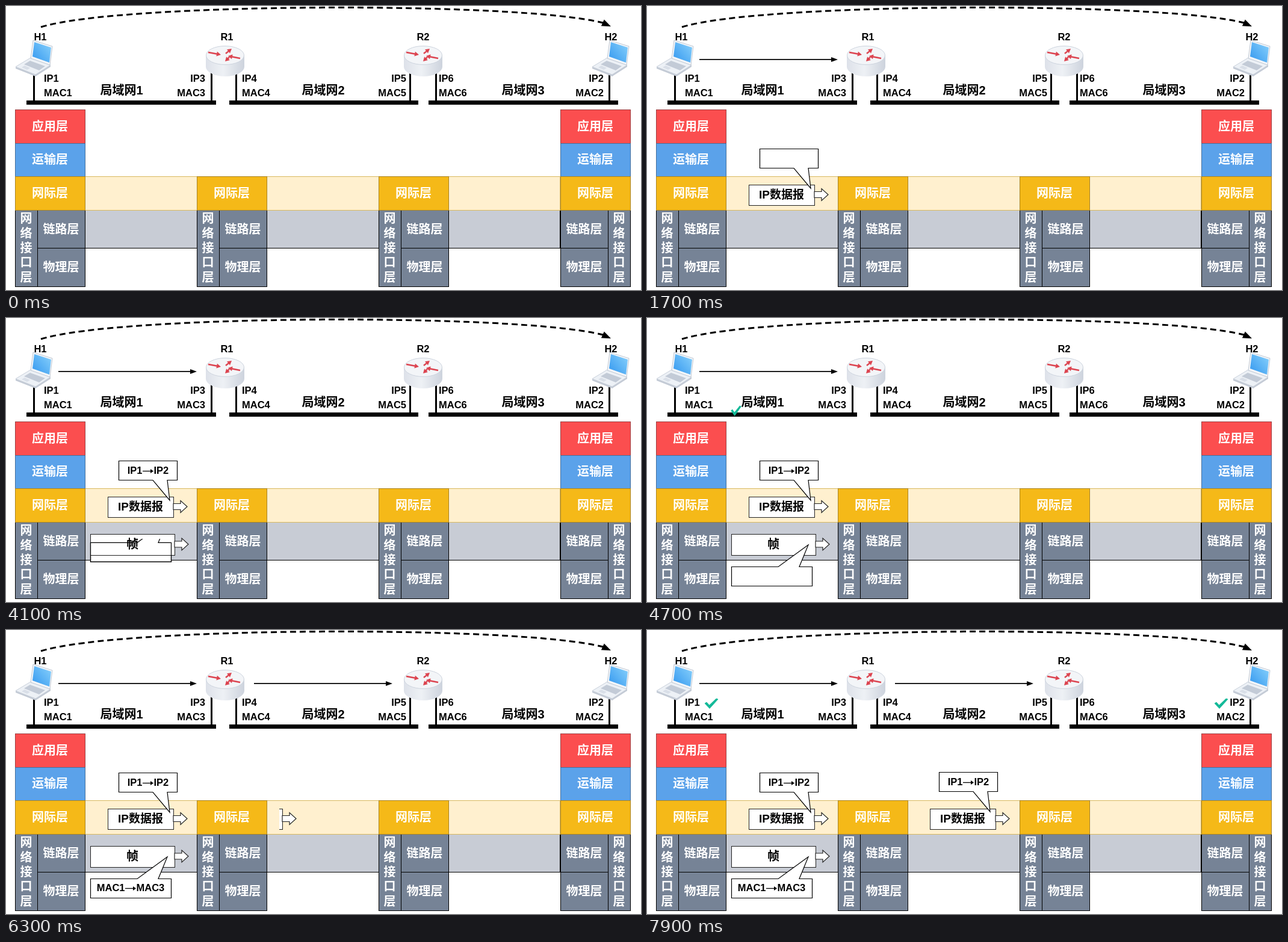
An HTML page with a canvas for the animation above (8000 ms loop, 1055x472 px).

```html
<!DOCTYPE html>
<html lang="zh">
<head>
<meta charset="utf-8">
<style>
html, body { margin: 0; width: 100%; height: 100%; overflow: hidden; background: #fff; }
canvas { display: block; }
</style>
</head>
<body>
<canvas id="stage" width="1055" height="472"></canvas>
<script>
const LOOP = 8000, STEP = 100;
const INK = '#000', SLATE = '#768396', GREEN = '#12b998';
const FONT = '"Liberation Sans", "Noto Sans CJK SC", "Noto Sans CJK", sans-serif';
const ctx = document.getElementById('stage').getContext('2d');

const progress = (t, start, duration) => Math.min(1, Math.max(0, (t - start) / duration));

function text(str, x, y, size = 16.5, color = INK, align = 'center') {
  ctx.font = `bold ${size}px ${FONT}`;
  ctx.fillStyle = color;
  ctx.textAlign = align;
  ctx.textBaseline = 'alphabetic';
  ctx.fillText(str, x, y + size * 0.36);
}

function box(x1, y1, x2, y2, fill, stroke = INK, width = 1) {
  ctx.fillStyle = fill;
  ctx.fillRect(x1, y1, x2 - x1, y2 - y1);
  ctx.strokeStyle = stroke;
  ctx.lineWidth = width;
  ctx.strokeRect(x1 + 0.5, y1 + 0.5, x2 - x1, y2 - y1);
}

function poly(points, fill, stroke, width = 1) {
  ctx.beginPath();
  points.forEach(([x, y]) => ctx.lineTo(x, y));
  ctx.closePath();
  if (fill) { ctx.fillStyle = fill; ctx.fill(); }
  if (stroke) { ctx.strokeStyle = stroke; ctx.lineWidth = width; ctx.stroke(); }
}

function line(x1, y1, x2, y2, width, color = INK) {
  ctx.strokeStyle = color;
  ctx.lineWidth = width;
  ctx.beginPath();
  ctx.moveTo(x1, y1);
  ctx.lineTo(x2, y2);
  ctx.stroke();
}

function at(x, y, draw) {
  ctx.save();
  ctx.translate(x, y);
  draw();
  ctx.restore();
}

function clipped(x, y, w, h, draw) {
  ctx.save();
  ctx.beginPath();
  ctx.rect(x, y, w, h);
  ctx.clip();
  draw();
  ctx.restore();
}

function arrowHead(x, y, angle, length, half, color = INK) {
  at(x, y, () => {
    ctx.rotate(angle);
    poly([[0, 0], [-length, -half], [-length, half]], color);
  });
}

function laptop(dx) {
  at(dx, 0, () => {
    poly([[16, 101], [41, 86], [74, 98], [74, 101], [49, 117], [16, 104]], '#c3cad5');
    poly([[16, 101], [41, 86], [74, 98], [49, 114]], '#edf1f6', '#ccd3dd');
    poly([[30, 97], [40, 91], [65, 100], [55, 107]], '#c3cbd7');
    poly([[26, 102], [31, 99], [40, 103], [35, 106]], '#d9dfe8');
    poly([[45, 57], [77, 67], [73, 98], [41, 87]], '#f4f6f9', '#c0c8d3');
    const screen = ctx.createLinearGradient(45, 88, 74, 64);
    screen.addColorStop(0, '#3c9df0');
    screen.addColorStop(1, '#82cdfb');
    poly([[47, 60], [75, 69], [72, 94], [44, 84]], screen);
  });
}

function router(dx) {
  at(dx, 0, () => {
    const side = ctx.createLinearGradient(332, 0, 396, 0);
    side.addColorStop(0, '#dde1e9');
    side.addColorStop(0.45, '#eef1f5');
    side.addColorStop(1, '#cdd3dd');
    ctx.fillStyle = side;
    ctx.beginPath();
    ctx.ellipse(364, 101, 32, 16, 0, 0, Math.PI);
    ctx.lineTo(332, 82);
    ctx.lineTo(396, 82);
    ctx.fill();
    ctx.fillStyle = '#f3f5f8';
    ctx.strokeStyle = '#cdd4de';
    ctx.lineWidth = 1;
    ctx.beginPath();
    ctx.ellipse(364, 82, 31.5, 15.5, 0, 0, Math.PI * 2);
    ctx.fill();
    ctx.stroke();
    const red = '#dc4450';
    for (const [x1, y1, x2, y2] of [[336, 77, 357, 81], [389, 87, 369, 83], [365, 79, 375, 71], [371, 85, 364, 92]]) {
      const angle = Math.atan2(y2 - y1, x2 - x1);
      line(x1, y1, x2 - 5 * Math.cos(angle), y2 - 5 * Math.sin(angle), 2.5, red);
      arrowHead(x2, y2, angle, 7, 4, red);
    }
  });
}

function network(x1, x2, stems, name, nameX) {
  stems.forEach(x => line(x + 0.5, 111, x + 0.5, 160, 3));
  line(x1, 160.5, x2, 160.5, 7);
  text(name, nameX, 140, 20);
}

function interfaceLabel(n, x, align) {
  text('IP' + n, x, 120.5, 16.5, INK, align);
  text('MAC' + n, x, 144, 16.5, INK, align);
}

function stack(x, isHost, mirrored) {
  const narrow = mirrored ? x + 79 : x, wide = mirrored ? x : x + 37;
  box(narrow, 339, narrow + 37, 466, SLATE);
  box(wide, 339, wide + 79, 402, SLATE);
  box(wide, 402, wide + 79, 466, SLATE);
  [...'网络接口层'].forEach((c, i) => text(c, narrow + 18.5, 353 + i * 24.4, 20, '#fff'));
  text('链路层', wide + 39.5, 371, 20, '#fff');
  text('物理层', wide + 39.5, 434, 20, '#fff');
  if (isHost) {
    box(x, 172, x + 116, 228, '#fb4e4f', '#9c3f42');
    box(x, 228, x + 116, 283, '#5ba2ea', '#456f9c');
    text('应用层', x + 58, 200, 20, '#fff');
    text('运输层', x + 58, 255, 20, '#fff');
  }
  box(x, 283, x + 116, 339, '#f5b918', '#a88324');
  text('网际层', x + 58, 311, 20, '#fff');
}

function scenery() {
  ctx.fillStyle = '#fff';
  ctx.fillRect(0, 0, 1055, 472);
  ctx.strokeStyle = INK;
  ctx.lineWidth = 3;
  ctx.setLineDash([10, 6]);
  ctx.beginPath();
  ctx.moveTo(58, 35);
  ctx.bezierCurveTo(190, -6, 850, -8, 992, 28);
  ctx.stroke();
  ctx.setLineDash([]);
  arrowHead(1005, 34, 0.42, 15, 6);

  network(34, 349, [46, 341], '局域网1', 192);
  network(371, 685, [382, 671], '局域网2', 527);
  network(702, 1017, [714, 1002], '局域网3', 859);
  [0, 958].forEach(laptop);
  [0, 329].forEach(router);
  [['H1', 57], ['R1', 367], ['R2', 693], ['H2', 1005]].forEach(([name, x]) => text(name, x, 51));
  [[1, 63, 'left'], [3, 331, 'right'], [4, 392, 'left'], [5, 665, 'right'], [6, 719, 'left'], [2, 993, 'right']]
    .forEach(args => interfaceLabel(...args));

  box(131, 339, 920, 402, '#c8ccd5');
  box(131, 283, 920, 339, '#fff0cf', '#d9b95f');
  stack(15, true, false);
  stack(317, false, false);
  stack(619, false, false);
  stack(921, true, true);
}

function hopArrow(x, p) {
  clipped(x, 80, 230 * p, 20, () => {
    line(x, 88.8, x + 221, 88.8, 1.7);
    arrowHead(x + 230, 89, 0, 11, 4);
  });
}

// A labelled box with a block arrow, pushed in from behind its left edge.
function packet(x, y, w, h, label, size, p) {
  if (!p) return;
  const travel = w + 41;
  clipped(x - 16, y - 10, travel + 4, h + 20, () => at(-travel * (1 - p), 0, () => {
    const r = x + w, m = y + h / 2 - 0.5;
    box(x, y, r, y + h, '#fff', '#222', 1);
    poly([[r, m - 5], [r + 12, m - 5], [r + 12, m - 10], [r + 23, m], [r + 12, m + 10], [r + 12, m + 5], [r, m + 5]],
      '#fff', '#222', 1.2);
    text(label, x + w / 2, m, size);
  }));
}

function datagram(dx, p) {
  at(dx, 0, () => packet(169, 297, 109, 34, 'IP数据报', 19, p));
}

function ipCallout(dx, dy, p) {
  if (!p) return;
  at(dx, dy, () => clipped(180, 230, 112, 83, () => at(0, 67 * (1 - p), () =>
    poly([[187.5, 237.5], [284.5, 237.5], [284.5, 269.5], [268, 269.5], [272, 303], [244, 269.5], [187.5, 269.5]],
      '#fff', INK, 1.2))));
}

function macCallout(p, fill) {
  if (!p) return;
  clipped(132, 367, 150, 84, () => at(0, -67 * (1 - p), () =>
    poly([[140.5, 413.5], [218, 413.5], [268, 377], [253, 413.5], [274.5, 413.5], [274.5, 445.5], [140.5, 445.5]],
      fill, INK, 1.2)));
}

// "from → to" around the centre x, wiped in from the left.
function route(from, to, x, y, width, p) {
  clipped(x - width / 2, y - 14, width * p, 28, () => {
    text(from, x - 9.5, y, 16.5, INK, 'right');
    line(x - 9, y + 1.5, x + 6, y + 1.5, 1.3);
    arrowHead(x + 9, y + 1.5, 0, 5, 3.5);
    text(to, x + 9.5, y, 16.5, INK, 'left');
  });
}

// Swoops in from the upper right, turning to face the viewer, until it rests at (x, y).
const SWOOP = [[198, -104], [107, -44], [23, 10], [0, 0], [0, 0]];
function check(t, x, y, start, duration, end) {
  if (t < start || t >= end) return;
  const p = progress(t, start, duration), i = Math.floor(p * 3), f = p * 3 - i;
  const [ox, oy] = [0, 1].map(k => SWOOP[i][k] * (1 - f) + SWOOP[i + 1][k] * f);
  at(x + ox, y + oy, () => {
    ctx.scale(0.3 + 0.7 * p, 1);
    poly([[-11, 0], [-8, -2], [-3.5, 3], [8, -8], [11, -7], [-3, 8.5]], GREEN, GREEN, 0.8);
  });
}

function draw(t) {
  scenery();
  hopArrow(87, progress(t, 900, 300));
  hopArrow(412, progress(t, 5800, 400));

  datagram(0, progress(t, 1200, 300));
  ipCallout(0, 0, progress(t, 1400, 300));
  route('IP1', 'IP2', 236, 253, 74, progress(t, 2500, 500));

  const slide = progress(t, 3900, 500);
  if (slide < 1) macCallout(slide, '#fff');
  packet(140, 359, 140, 35, '帧', 20, progress(t, 3500, 400));
  macCallout(slide, slide < 1 ? null : '#fff');
  route('MAC1', 'MAC3', 207, 428, 118, progress(t, 5000, 500));

  datagram(301, progress(t, 6200, 500));
  ipCallout(298, -1, progress(t, 6700, 500));
  route('IP1', 'IP2', 534, 252, 74, progress(t, 7500, 400));

  check(t, 105, 122, 1870, 230, 3600);
  check(t, 952, 122, 2300, 200, 3600);
  check(t, 125, 144, 4500, 300, 5900);
  check(t, 270, 144, 4800, 300, 5900);
  check(t, 107, 122, 7170, 230, LOOP);
  check(t, 954, 122, 7400, 200, LOOP);
}

const begin = performance.now();
function tick() {
  const t = (performance.now() - begin) % LOOP;
  draw(Math.floor(t / STEP) * STEP);
  requestAnimationFrame(tick);
}
tick();
</script>
</body>
</html>
```
